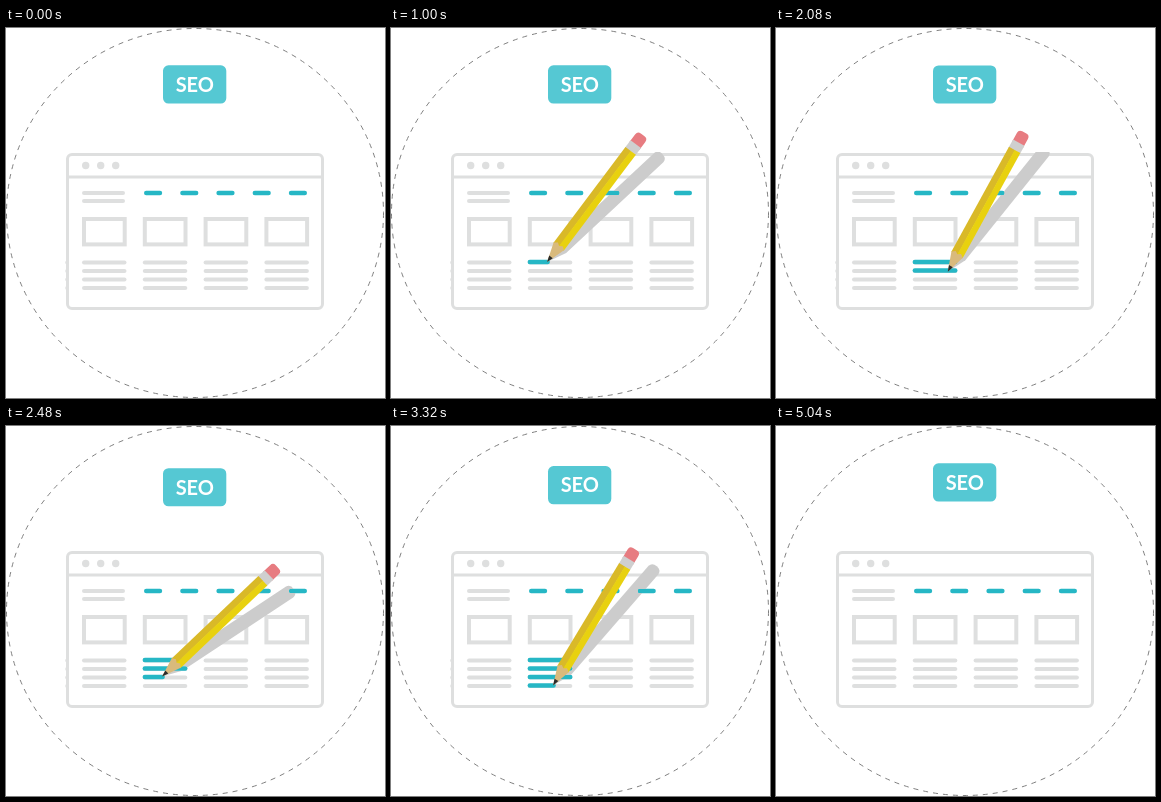
Recreate the animation shown at these times as an HTML page with a canvas. Size 379 px wide and 370 px high, loop 5080 ms.

```html
<!DOCTYPE html>
<html lang="en">
<head>
<meta charset="utf-8">
<title>SEO</title>
<style>
  html, body { margin: 0; width: 100%; height: 100%; overflow: hidden; background: #fff; }
  canvas { display: block; }
</style>
</head>
<body>
<canvas id="stage" width="379" height="370"></canvas>
<script>
const ctx = document.getElementById('stage').getContext('2d');
const LOOP = 5080, GREY = '#dedfdf', TEAL = '#26b7c5', RAD = Math.PI / 180;
const ROWS = [234.5, 243, 251.5, 260];
const LINE_STARTS = [680, 1420, 2160, 2900], LINE_TIME = 640;

// Pencil track: time, tip x, tip y, tilt in degrees
const TRACK = [
  [100, 395, 287, 80], [330, 303, 284, 66], [560, 212, 268, 42],
  [680, 137, 234, 38], [1000, 156, 234, 37], [1320, 181, 234, 26],
  [1420, 137, 242, 24], [1640, 148, 242, 25.4], [2060, 181, 242, 25],
  [2160, 137, 250.5, 43], [2480, 156, 250.5, 46.5], [2800, 181, 250.5, 36],
  [2900, 137, 259.5, 37], [3320, 162, 259.5, 31], [3540, 181, 259.5, 36],
  [3800, 238, 276, 58], [4120, 331, 282, 79], [4300, 400, 288, 82]
];

const clamp = v => Math.max(0, Math.min(1, v));
const easeInOut = p => (1 - Math.cos(Math.PI * clamp(p))) / 2;

function pencilAt(t) {
  const i = TRACK.findIndex(key => key[0] > t);
  if (i < 1) return null;
  const a = TRACK[i - 1], b = TRACK[i], p = (t - a[0]) / (b[0] - a[0]);
  const [, x, y, tilt] = a.map((v, k) => v + (b[k] - v) * p);
  return { x, y, tilt };
}

function bar(x1, x2, y, color, width = 4) {
  ctx.strokeStyle = color;
  ctx.lineWidth = width;
  ctx.lineCap = 'round';
  ctx.beginPath();
  ctx.moveTo(x1, y);
  ctx.lineTo(x2, y);
  ctx.stroke();
}

function shape(color, ...points) {
  ctx.fillStyle = color;
  ctx.beginPath();
  points.forEach(([x, y]) => ctx.lineTo(x, y));
  ctx.fill();
}

function roundBox(x, y, w, h, r, color) {
  ctx.fillStyle = color;
  ctx.beginPath();
  ctx.roundRect(x, y, w, h, r);
  ctx.fill();
}

function outerCircle() {
  ctx.beginPath();
  ctx.ellipse(189, 185, 188.5, 184.5, 0, 0, 2 * Math.PI);
}

function drawBadge(t) {
  const y = 37.3 + 2.5 * (1 - Math.cos(2 * Math.PI * t * 5 / LOOP));
  roundBox(157, y, 63.3, 38.2, 5.5, '#55c8d3');
  ctx.fillStyle = '#fff';
  ctx.font = '700 20px Lato, sans-serif';
  ctx.textAlign = 'center';
  ctx.fillText('SEO', 188.8, y + 26.4);
}

function drawBrowser() {
  ctx.strokeStyle = GREY;
  ctx.lineWidth = 3;
  ctx.beginPath();
  ctx.roundRect(61.5, 126.5, 255, 154, 4.5);
  ctx.moveTo(61.5, 149);
  ctx.lineTo(316.5, 149);
  ctx.stroke();
  for (const x of [79.7, 94.7, 109.7]) roundBox(x - 3.7, 133.8, 7.4, 7.4, 3.7, GREY);
  bar(78, 117, 165, GREY);
  bar(78, 117, 173, GREY);
  for (let i = 0; i < 5; i++) bar(140.2 + 36.2 * i, 154 + 36.2 * i, 165, TEAL, 4.4);
  ctx.strokeStyle = GREY;
  ctx.lineWidth = 4;
  for (let i = 0; i < 4; i++) ctx.strokeRect(78 + 60.8 * i, 191, 40.7, 25.4);
}

function drawColumns(t, pencil) {
  const shift = 243.2 * easeInOut((t - 4320) / 680);
  ctx.save();
  ctx.beginPath();
  ctx.rect(59, 150, 260, 130);
  ctx.clip();
  for (let col = -4; col < 4; col++) {
    const x = 78 + 60.8 * col + shift;
    ROWS.forEach((y, row) => {
      bar(x, x + 40.5, y, GREY);
      const age = t - LINE_STARTS[row];
      if (col !== 1 || age < 0) return;
      const reach = age < LINE_TIME ? clamp((pencil.x - 138) / 41) : 1;
      bar(x, x + 40.5 * reach, y - 0.5, TEAL, 4.4);
    });
  }
  ctx.restore();
}

function drawShadow({ x, y, tilt }) {
  const lift = clamp((y - 261) / 12);
  ctx.save();
  ctx.globalAlpha = lift;
  ctx.fillStyle = '#e9e9e9';
  ctx.beginPath();
  ctx.ellipse(x - 10, y + 15, 11, 4.2, 0, 0, 2 * Math.PI);
  ctx.fill();
  ctx.globalAlpha = 1 - lift;
  ctx.globalCompositeOperation = 'darken';
  ctx.beginPath();
  ctx.rect(0, 124, 379, 246);
  ctx.clip();
  ctx.translate(x, y);
  ctx.rotate((tilt + 10) * RAD);
  ctx.fillStyle = '#ccc';
  ctx.beginPath();
  ctx.moveTo(0, 0);
  ctx.lineTo(6.5, -20);
  ctx.lineTo(6.5, -153);
  ctx.quadraticCurveTo(6, -158, 0, -158);
  ctx.quadraticCurveTo(-6, -158, -6.5, -153);
  ctx.lineTo(-6.5, -20);
  ctx.fill();
  ctx.restore();
}

function drawPencil({ x, y, tilt }) {
  ctx.save();
  ctx.translate(x, y);
  ctx.rotate(tilt * RAD);
  roundBox(-6.3, -159, 12.6, 14, [4, 4, 0, 0], '#e77c81');
  shape('#cfcfcf', [-6.5, -138], [-6.5, -147.5], [6.5, -147.5], [6.5, -138]);
  shape('#d9b928', [-6.5, -19], [-6.5, -139], [0.5, -139], [0.5, -19]);
  shape('#e8d10f', [0, -19], [0, -139], [6.5, -139], [6.5, -19]);
  shape('#d9ba7c', [0, 0], [-6.5, -19.5], [-3, -22], [0, -20], [3, -22], [6.5, -19.5]);
  shape('#2b2b2b', [0, 0], [-2.2, -6.5], [2.2, -6.5]);
  ctx.restore();
}

function draw(t) {
  const pencil = pencilAt(t);
  ctx.fillStyle = '#fff';
  ctx.fillRect(0, 0, 379, 370);
  drawBrowser();
  drawColumns(t, pencil);
  drawBadge(t);
  if (pencil) {
    ctx.save();
    outerCircle();
    ctx.clip();
    drawShadow(pencil);
    drawPencil(pencil);
    ctx.restore();
  }
  ctx.strokeStyle = '#808080';
  ctx.lineWidth = 1;
  ctx.lineCap = 'butt';
  ctx.setLineDash([5, 5]);
  outerCircle();
  ctx.stroke();
  ctx.setLineDash([]);
}

const start = performance.now();
function tick() {
  draw((performance.now() - start) % LOOP);
  requestAnimationFrame(tick);
}
tick();
</script>
</body>
</html>
```
